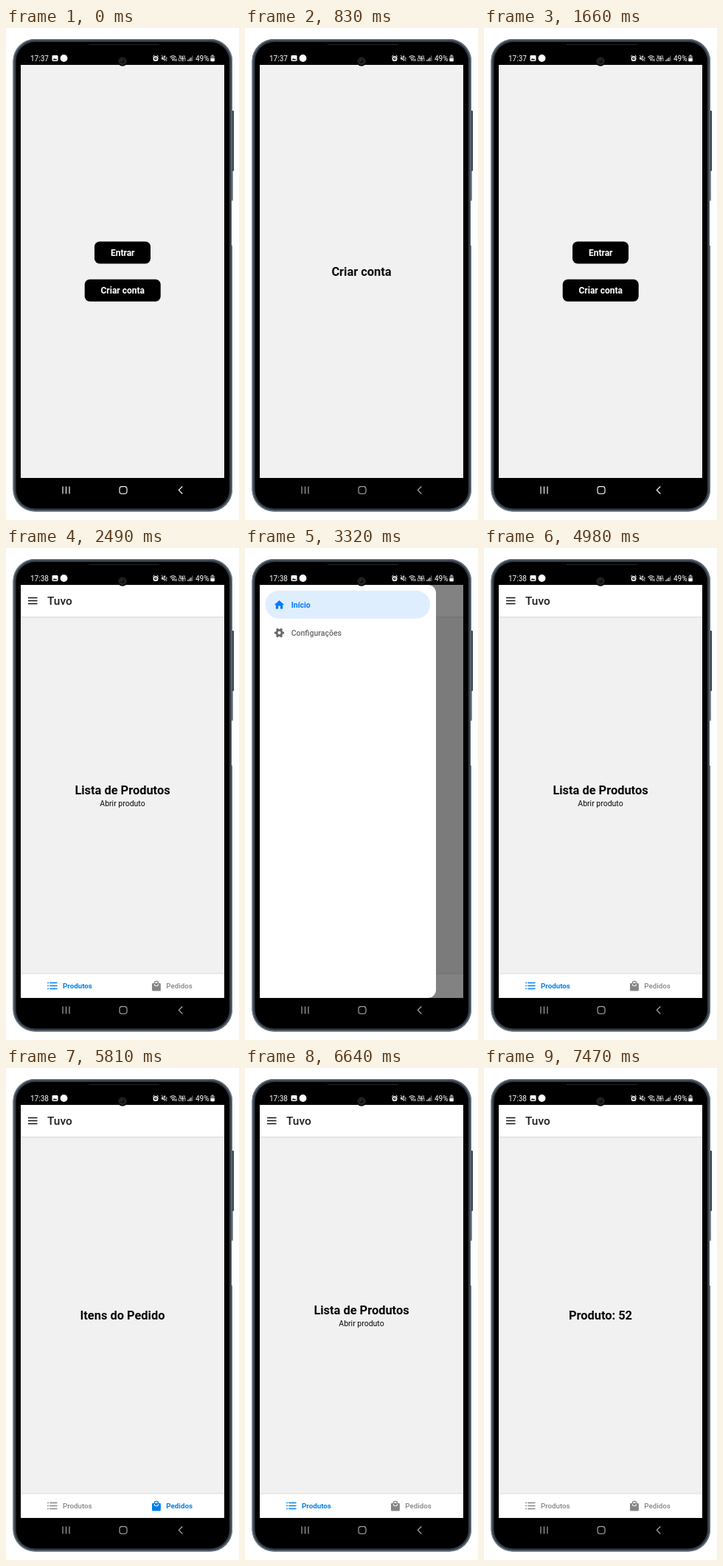
An HTML page for the animation above (8.3 s loop, 316 by 667 pixels).

```html
<!DOCTYPE html>
<html lang="pt">
<head>
<meta charset="utf-8">
<title>App</title>
<style>
html, body { margin: 0; width: 100%; height: 100%; overflow: hidden; background: #fff; }
svg { display: block; width: 100%; height: 100%; font-family: Roboto, sans-serif; }
</style>
</head>
<body>
<svg viewBox="0 0 316 667">
  <defs>
    <linearGradient id="shade" x1="0" y1="0" x2="0" y2="1">
      <stop offset="0" stop-color="#d8d8d8"/>
      <stop offset="1" stop-color="#f1f1f1"/>
    </linearGradient>
    <clipPath id="clip"><rect x="20" y="50" width="276" height="560"/></clipPath>
  </defs>

  <!-- phone -->
  <rect x="304" y="112" width="5" height="82" rx="1.2" fill="#36424e"/>
  <rect x="304" y="190" width="3.6" height="44" fill="#36424e"/>
  <rect x="9.5" y="15" width="297.5" height="640.5" rx="30" fill="#323d48"/>
  <rect x="10.3" y="15.8" width="295.9" height="638.9" rx="29.2" fill="none" stroke="#66717d" stroke-width="1.6"/>
  <rect x="13.5" y="19" width="289.5" height="632.5" rx="26" fill="#000"/>
  <rect x="306" y="234" width="3" height="61" fill="#fff"/>
  <path d="M112 22.5h96" stroke="#26262a"/>

  <g id="screen" clip-path="url(#clip)"></g>

  <!-- camera -->
  <circle cx="158" cy="45" r="6.8" fill="#080808"/>
  <circle cx="158" cy="45" r="4.6" fill="#1d1d1f" stroke="#353538" stroke-width=".8"/>
  <circle cx="158" cy="45" r="2" fill="#08080b"/>
  <circle cx="157.2" cy="44" r=".8" fill="#5a5a64"/>

  <!-- status bar -->
  <g fill="#fff">
    <text id="clock" x="33" y="44.5" font-size="10"></text>
    <rect x="62.5" y="37" width="8" height="8" rx="1.4"/>
    <path d="M63.6 43.5l1.8-2.5 1.4 1.5 1-1.1 1.7 2.1z" fill="#000"/>
    <circle cx="78.5" cy="41" r="4.9"/>
    <circle cx="203" cy="41.4" r="2.7" fill="none" stroke="#fff" stroke-width="1.6"/>
    <path d="M199.3 38.6l2-1.7M206.7 38.6l-2-1.7M203 40v1.7h1.2M200.6 45l.8-.8M205.4 45l-.8-.8" fill="none" stroke="#fff"/>
    <path d="M211 39.5h2l3-2.5v8l-3-2.5h-2z"/>
    <path d="M210.8 36.8l7.8 8.4" stroke="#000" stroke-width="2"/>
    <path d="M211 37l7.4 8M217.5 39.5q1 1.5 0 3" fill="none" stroke="#fff" stroke-width=".9"/>
    <path d="M222.5 39.6q4-3.6 8 0M224 41.3q2.5-2.2 5 0" fill="none" stroke="#fff" stroke-width="1.1"/>
    <circle cx="226.5" cy="43.2" r="1.1"/>
    <path d="M229 45v-3M231 41.5v3.5" stroke="#fff" stroke-width=".9"/>
    <text x="234.5" y="40.6" font-size="4.6" font-weight="700">Vo))</text>
    <text x="234" y="45.2" font-size="4.6" font-weight="700">LTE1</text>
    <path d="M246.8 45v-1.8M248.8 45v-3.4M250.8 45v-5" stroke="#fff" stroke-width="1.1"/>
    <path d="M252.8 45v-7.5" stroke="#777" stroke-width="1.1"/>
    <text x="257" y="44.5" font-size="10">49%</text>
    <rect x="278.8" y="36.6" width="2.6" height="1.6"/>
    <rect x="277.4" y="37.6" width="5.4" height="7.6" rx="1" fill="#777"/>
    <path d="M277.4 41.2h5.4v3q0 1-1 1h-3.4q-1 0-1-1z"/>
  </g>

  <g id="nav" fill="none" stroke-width="1.2">
    <path d="M77 621.5v10M81.5 621.5v10M86 621.5v10"/>
    <rect x="154" y="621.7" width="10" height="9.8" rx="3.2"/>
    <path d="M239.3 621.5l-5 5 5 5"/>
  </g>
</svg>
<script>
const STEP = 830;
const STEPS = ['welcome', 'signup', 'welcome', 'list', 'drawer', 'settings', 'list', 'orders', 'list', 'product'];
const BLUE = '#0080ea', GREY = '#858585';
const $ = id => document.getElementById(id);

const rect = (x, y, w, h, fill, r = 0) =>
  `<rect x="${x}" y="${y}" width="${w}" height="${h}" rx="${r}" fill="${fill}"/>`;
const text = (s, x, y, size, fill, weight = 400, anchor = 'start') =>
  `<text x="${x}" y="${y}" font-size="${size}" fill="${fill}" font-weight="${weight}" text-anchor="${anchor}">${s}</text>`;
const title = (s, y) => text(s, 158, y, 16.4, '#080808', 700, 'middle');
const button = (s, x, y, w) =>
  rect(x, y, w, 30, '#000', 7) + text(s, 158.2, y + 19.4, 12, '#fff', 700, 'middle');

const base = rect(20, 49, 276, 562, '#f1f1f1');
const header = rect(20, 49, 276, 44, '#fff') + rect(20, 93, 276, 2, 'url(#shade)') +
  '<path d="M30 67.5h12.5M30 71.5h12.5M30 75.5h12.5" stroke="#111" stroke-width="1.4"/>' +
  text('Tuvo', 56, 77, 15.4, '#1c1c1e', 500);

const listIcon = c =>
  `<path d="M59.2 589.5h10.3M59.2 593.5h10.3M59.2 597.5h10.3M56.2 589.5h1.7M56.2 593.5h1.7M56.2 597.5h1.7" stroke="${c}" stroke-width="1.4"/>`;
const bagIcon = c =>
  `<path transform="translate(196 586) scale(.66)" fill="${c}" d="M12 12.6a5 5 0 0 1-5-4.6h1.8a3.2 3.2 0 0 0 6.4 0H17a5 5 0 0 1-5 4.6z` +
  'M12 3a3 3 0 0 1 3 3H9a3 3 0 0 1 3-3zM19 6h-2A5 5 0 0 0 7 6H5a2 2 0 0 0-2 2v12a2 2 0 0 0 2 2h14a2 2 0 0 0 2-2V8a2 2 0 0 0-2-2z" fill-rule="evenodd"/>';

function tabs(active) {
  const color = i => i === active ? BLUE : GREY;
  const label = (s, x, i) => text(s, x, 597.3, 9.75, color(i), i === active ? 700 : 500);
  return rect(20, 577, 276, 34, '#fff') + rect(20, 576.5, 276, 1, '#dcdcdc') +
    listIcon(color(0)) + label('Produtos', 77, 0) +
    bagIcon(color(1)) + label('Pedidos', 217.3, 1);
}

const listPage = base + header + title('Lista de Produtos', 334) +
  text('Abrir produto', 158, 350.3, 10.5, '#080808', 400, 'middle') + tabs(0);

const gear = '<g fill="none" stroke="#666"><circle cx="46.5" cy="115" r="3.6" stroke-width="2.9"/>' +
  '<circle cx="46.5" cy="115" r="5.5" stroke-width="2.2" pathLength="12" stroke-dasharray="1 1" stroke-dashoffset=".5"/></g>';

const screens = {
  welcome: base + button('Entrar', 120, 289.5, 76) + button('Criar conta', 106.7, 340.7, 103),
  signup: base + title('Criar conta', 336),
  list: listPage,
  drawer: listPage + rect(20, 49, 276, 562, 'rgba(0,0,0,.49)') +
    rect(8, 50, 251, 560, '#fff', 11) +
    rect(27.5, 57.8, 223.5, 38, '#deeeff', 19) +
    '<path d="M46.5 71l6.7 6h-2v5.4h-3.3v-4h-2.8v4h-3.3V77h-2z" fill="#007aff"/>' +
    text('Início', 62.7, 80.8, 10.5, '#007aff', 700) +
    gear + text('Configurações', 62.7, 118.8, 10.5, '#666', 500),
  settings: base + header + title('Configurações', 358),
  orders: base + header + title('Itens do Pedido', 341.3) + tabs(1),
  product: base + header + title('Produto: 52', 341.3) + tabs(-1)
};

let shown = -1;
function draw(time) {
  const step = Math.floor(time / STEP) % STEPS.length;
  if (step === shown) return;
  shown = step;
  const name = STEPS[step];
  $('screen').innerHTML = screens[name];
  $('clock').textContent = step < 3 ? '17:37' : '17:38';
  $('nav').setAttribute('stroke', name === 'welcome' ? '#f4f4f4' : '#a6a6a6');
}

const start = performance.now();
function tick() {
  draw(performance.now() - start);
  requestAnimationFrame(tick);
}
tick();
</script>
</body>
</html>
```
